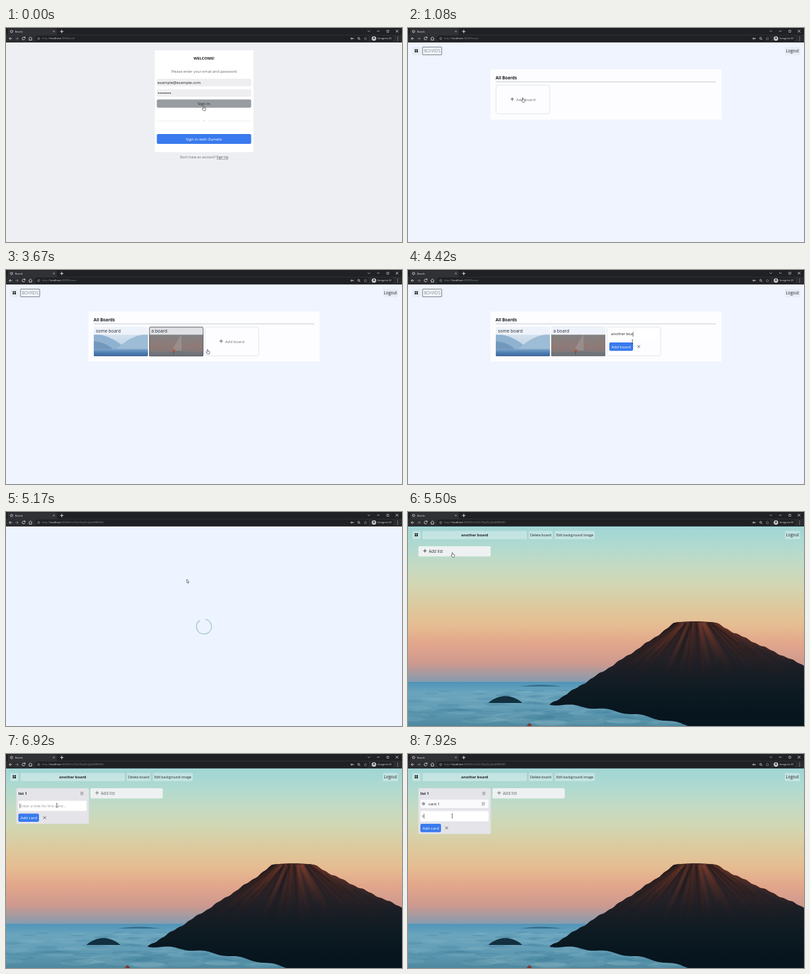
An HTML page with a canvas that plays this animation: 600x325 px, repeating every 8 s.

```html
<!DOCTYPE html>
<html lang="en">
<head>
<meta charset="utf-8">
<title>Boards</title>
<style>
  html, body { margin: 0; width: 100%; height: 100%; overflow: hidden; background: #eff4fe; }
  canvas { display: block; width: 600px; height: 325px; }
</style>
</head>
<body>
<canvas id="stage"></canvas>
<script>
const LOOP = 8000, TAU = Math.PI * 2;
const canvas = document.getElementById('stage');
const ratio = window.devicePixelRatio || 1;
canvas.width = 600 * ratio;
canvas.height = 325 * ratio;
const ctx = canvas.getContext('2d');

// ---------- helpers ----------
const smooth = k => k * k * (3 - 2 * k);
const random = seed => { const n = Math.sin(seed * 127.1) * 43758.5; return n - Math.floor(n); };

function box(x, y, w, h, fill, radius = 0, stroke, line = 0.7) {
  ctx.beginPath();
  ctx.roundRect(x, y, w, h, radius);
  if (fill) { ctx.fillStyle = fill; ctx.fill(); }
  if (stroke) { ctx.strokeStyle = stroke; ctx.lineWidth = line; ctx.stroke(); }
}

function label(str, x, y, size, color = '#222', weight = 400, align = 'left') {
  ctx.font = `${weight} ${size}px "Open Sans", "Noto Sans", sans-serif`;
  ctx.textAlign = align;
  ctx.fillStyle = color;
  ctx.fillText(str, x, y + size * 0.34);
  return x + ctx.measureText(str).width;
}

// Draws an SVG path whose coordinates are relative to (x, y).
function glyph(d, x, y, stroke, line = 0.8, fill) {
  ctx.save();
  ctx.translate(x, y);
  const p = new Path2D(d);
  if (fill) { ctx.fillStyle = fill; ctx.fill(p); }
  ctx.strokeStyle = stroke;
  ctx.lineWidth = line;
  ctx.stroke(p);
  ctx.restore();
}

function ring(x, y, r, color, width = 0.7, from = 0, to = TAU) {
  ctx.beginPath();
  ctx.arc(x, y, r, from, to);
  ctx.strokeStyle = color;
  ctx.lineWidth = width;
  ctx.stroke();
}

function blob(x, y, rx, ry, fill) {
  ctx.beginPath();
  ctx.ellipse(x, y, rx, ry, 0, 0, TAU);
  ctx.fillStyle = fill;
  ctx.fill();
}

// Evenly spaced colours from top to bottom.
function fade(top, bottom, ...colors) {
  const g = ctx.createLinearGradient(0, top, 0, bottom);
  colors.forEach((c, i) => g.addColorStop(i / (colors.length - 1), c));
  return g;
}

// Path of the area between two curves of x.
function between(from, to, upper, lower) {
  ctx.beginPath();
  for (let x = from; x <= to; x++) ctx.lineTo(x, upper(x));
  for (let x = to; x >= from; x--) ctx.lineTo(x, lower(x));
  ctx.closePath();
}

function hill(from, to, upper, base, fill) {
  between(from, to, upper, () => base);
  ctx.fillStyle = fill;
  ctx.fill();
}

const plus = (x, y, color) => glyph('M-2.6 0h5.2M0-2.6v5.2', x, y, color, 0.9);
const cross = (x, y, color) => glyph('M-2-2l4 4M-2 2l4-4', x, y, color);
const trash = (x, y) => glyph('M-2.2-1.8h4.4M-1.5-1.8v4h3v-4M0-.6v1.8', x, y, '#777', 0.6);

// ---------- browser window ----------
function chrome(path) {
  const icon = '#e2e4e7', dim = '#85888d';
  box(0, 0, 600, 10.5, '#202124');
  box(0, 10, 600, 12, '#2b2c30');
  box(3, 0.8, 74, 12, '#303135', 2);
  ring(8.5, 5.3, 1.7, icon, 0.8);
  label('Boards', 13.7, 5.3, 3.6, icon);
  glyph('M-1.1-1.1l2.2 2.2m0-2.2l-2.2 2.2', 72.5, 5.3, icon, 0.6);
  plus(84.5, 5.3, icon);
  glyph('M-1.8-.8L0 .8 1.8-.8', 549.8, 4.8, icon, 0.6);
  glyph('M-2 0h4', 564, 4.8, icon, 0.6);
  box(577, 3.4, 3, 3, null, 0, icon, 0.6);
  cross(592.5, 4.8, icon);

  glyph('M2.2 0h-4.4l2-2m-2 2l2 2', 7, 16, icon);
  glyph('M-2.2 0h4.4l-2-2m2 2l-2 2', 16.4, 16, dim);
  ring(26.5, 16, 2, icon, 0.8, 0.2, 5.4);
  glyph('M.5-2.5h2.2v2.2z', 26.5, 16, icon, 0.2, icon);
  glyph('M-2.7 0L0-2.5 2.7 0M-1.8-.5v2.9h3.6v-2.9', 37, 16, icon);

  box(44, 11.5, 506, 9, '#1f2023', 4.5);
  ring(49.5, 16, 1.7, '#a0a3a8', 0.6);
  glyph('M0-.4v1.4', 49.5, 16, '#a0a3a8', 0.6);
  let x = label('http://', 54.5, 16, 4.1, dim);
  x = label('localhost', x, 16, 4.1, icon);
  label(':3000/' + path, x, 16, 4.1, dim);

  ring(523.5, 16, 1, icon, 0.8);
  glyph('M1 0h2.7', 523.5, 16, icon);
  ring(534.3, 15.6, 1.4, icon);
  glyph('M1 1l1.4 1.4', 534.3, 15.6, icon);
  glyph('M0-2.2l.7 1.5 1.6.2-1.2 1.1.3 1.6L0 1.4l-1.4.8.3-1.6-1.2-1.1 1.6-.2z', 544.6, 16, icon, 0.3);
  box(552.5, 11.8, 35, 8.6, '#202124', 4.3);
  blob(557.5, 16, 3.3, 3.3, '#f1f3f4');
  glyph('M-2-.3h4l-1-1.7h-2z', 557.5, 16, '#333', 0.2, '#333');
  for (const side of [-1, 1]) ring(557.5 + side * 1.1, 17, 0.7, '#333', 0.5);
  label('Incognito (2)', 563, 16, 3.7, icon);
  for (let i = -1; i <= 1; i++) blob(593.5, 16 + i * 2.2, 0.5, 0.5, icon);
}

function navButton(x, w, text, size, fill, weight) {
  box(x, 28.7, w, 12.5, fill, 1.5);
  label(text, x + w / 2, 35, size, '#22262a', weight, 'center');
}

function gridButton(fill) {
  box(6.5, 28.7, 12.5, 12.5, fill, 1.5);
  for (let i = 0; i < 4; i++) box(10.2 + (i % 2) * 2.7, 32.3 + (i >> 1) * 2.7, 2.1, 2.1, '#15181b', 0.3);
}

// ---------- pictures ----------
const SUMMIT = 168;

function ridge(x) {
  const rough = Math.sin(x * 0.45) * 0.5 + Math.sin(x * 0.17) * 0.7;
  if (x < 404) return SUMMIT + 124 * ((404 - x) / 189) ** 0.93 + rough;
  if (x > 466) return SUMMIT + 65 * ((x - 466) / 134) ** 0.93 + rough;
  return SUMMIT - 2 * Math.sin((x - 404) / 62 * Math.PI);
}

function foot(x) {
  return Math.min(325, 292 + 33 * Math.max(0, (x - 215) / 213) ** 1.5 + Math.sin(x * 0.12) * 1.5);
}

function clouds() {
  box(0, 258, 600, 67, fade(258, 325, '#4f94b8', '#6ba5bd', '#659fb8', '#5b96af', '#4d889f'));
  for (let i = 0; i < 130; i++) {
    const depth = random(i + 0.5);
    const color = random(i + 0.7) < 0.55 ? '150,192,206' : '42,108,140';
    blob(random(i) * 440, 267 + depth * 56, 8 + depth * 20, 1 + depth * 3, `rgba(${color},.16)`);
  }
}

function mountain() {
  ctx.save();
  between(215, 600, ridge, foot);
  ctx.fillStyle = fade(SUMMIT, 310, '#442a29', '#2e2427', '#1a1e25', '#0d1a22', '#06151e');
  ctx.fill();
  ctx.clip();
  // Lit streaks and gullies fan out from the crater, redder on the right.
  for (let i = 0; i < 90; i++) {
    const turn = random(i + 0.2), angle = Math.PI * (0.13 + 0.72 * turn);
    const length = 50 + 110 * random(i + 0.4);
    const x = 466 - 58 * turn, lit = random(i + 0.6) > 0.25 + turn * 0.5;
    ctx.strokeStyle = fade(SUMMIT, SUMMIT + 95, lit ? 'rgba(132,62,42,.28)' : 'rgba(14,18,24,.3)', 'rgba(40,24,26,0)');
    ctx.lineWidth = 2 + 5 * random(i + 0.8);
    ctx.beginPath();
    ctx.moveTo(x, SUMMIT);
    ctx.lineTo(x + Math.cos(angle) * length, SUMMIT + Math.sin(angle) * length);
    ctx.stroke();
  }
  ctx.restore();
}

function volcano() {
  box(0, 22, 600, 238, fade(22, 260, '#a0d5d5', '#b0dad0', '#c4dac3', '#d2d6b2', '#dcca9f', '#e6bd92', '#e2a68b', '#cd998f', '#7f9cb2'));
  clouds();
  hill(170, 233, x => 265 - 2.6 * Math.sin((x - 170) / 63 * Math.PI), 265, '#356c8a');
  hill(122, 173, x => 290 - 10.5 * Math.sin((x - 122) / 51 * Math.PI) ** 0.8, 290, '#12303f');
  mountain();
  hill(180, 188, x => 320.5 + Math.abs(x - 184), 325, '#7c3631');
}

function lake() {
  box(0, 0, 82, 34, fade(0, 34, '#e4ebf3', '#b9d0e4'));
  hill(0, 50, x => 11 + 23 * (x / 50) ** 2, 34, '#8fb2d0');
  hill(34, 82, x => 11 + 23 * ((82 - x) / 48) ** 2, 34, '#9dbcd6');
  hill(0, 30, x => 22 + 12 * (x / 30) ** 2, 34, '#7299bd');
  box(0, 33.5, 82, 12, fade(33.5, 45, '#7fa5c9', '#4c7db2', '#3f6797'));
}

function dusk() {
  box(0, 0, 82, 45, fade(0, 45, '#818c90', '#84807f', '#8f7a77', '#74777b'));
  hill(34, 49, x => 36 - (x - 34) * 1.7, 36, 'rgba(190,195,195,.25)');
  hill(0, 82, x => 38 + Math.sin(x / 9), 45, '#70747a');
  blob(37, 36, 3, 2.6, '#a9655a');
  glyph('M0 0v6', 37, 36, '#4b4342');
}

function volcanoThumb() {
  ctx.scale(0.15, 0.15);
  ctx.translate(-45, -24);
  volcano();
}

// ---------- forms ----------
// Text typed evenly within a span of time.
function typed(str, t, start, end) {
  return str.slice(0, Math.max(0, Math.ceil((t - start) / (end - start) * str.length)));
}

function textInput(x, y, w, h, text, hint, t) {
  const mid = y + h / 2;
  box(x, y, w, h, '#fff', 2);
  const end = label(text || hint, x + 2.5, mid, 5.8, text ? '#222' : '#8e9196');
  if (text || t % 1060 < 960) glyph('M0-3.8v7.6', text ? end + 0.3 : x + 2.2, mid, '#222', 0.6);
}

function formButtons(x, y, text, w = 31.3) {
  box(x, y, w, 12.7, '#397aee', 2);
  label(text, x + w / 2, y + 6.5, 6, '#fff', 400, 'center');
  cross(x + w + 8.5, y + 6.3, '#3e4248');
}

// ---------- pages ----------
function loginPage() {
  const centered = (str, y, size, color, weight) => label(str, 300, y, size, color, weight, 'center');
  const field = (y, h, fill) => box(228.5, y, 143, h, fill, 2);
  box(0, 22, 600, 303, '#eeeff2');
  box(225.5, 34, 149.5, 154.5, '#fff');
  centered('WELCOME!', 46, 6, '#1c1c1e', 700);
  centered('Please enter your email and password', 66.5, 5.57, '#65676b');
  field(77, 11.5, '#eeeef1');
  label('example@example.com', 229.5, 83, 5.9);
  field(93, 11.5, '#eeeef1');
  for (let i = 0; i < 8; i++) blob(231.2 + i * 2.55, 98.8, 0.85, 0.85, '#222');
  field(108.5, 12.5, '#989da2');
  centered('Sign In', 115, 6.1, '#26282b');
  glyph('M229 141h65m12 0h65', 0, 0, '#e6e6ea');
  centered('or', 141, 4.2, '#c3c4c8');
  field(161, 15, '#397aee');
  centered('Sign in with Zumelo', 169, 6, '#fff');
  const x = label("Don't have an account? ", 263.5, 196.5, 5, '#66686c');
  const end = label('Sign Up', x, 196.5, 5, '#3c3e42');
  box(x, 199, end - x, 0.4, '#55575b');
}

function loaderPage(t) {
  box(0, 22, 600, 303, '#edf4ff');
  const turn = (t - 5170) / 1000 * TAU - 1.4;
  ring(300, 174, 11.4, '#a4c6d2', 1.3, turn, turn + 5.5);
}

const boards = [
  { title: 'some board', photo: lake, open: 1150, made: 2310 },
  { title: 'a board', photo: dusk, open: 2640, made: 3380, hover: 360 },
  { title: 'another board', photo: volcanoThumb, open: 3880, made: 4660, hover: 400 },
];
const cardX = i => 133 + 84 * i;

function boardCard(x, board, t) {
  const hovered = t - board.made < board.hover;
  ctx.save();
  ctx.beginPath();
  ctx.roundRect(x, 86.5, 82, 44.5, 1.5);
  ctx.clip();
  ctx.translate(x, 86.5);
  board.photo();
  ctx.restore();
  box(x, 86.5, 82, 11.7, hovered ? '#dfe1e5' : '#eef2fa', 1);
  if (hovered) box(x + 0.3, 86.8, 81.4, 43.9, null, 1.5, '#4a4d52', 0.8);
  label(board.title, x + 3.3, 93, 6.7, '#24282e');
}

function addBoardCard(x, board, t) {
  box(x + 0.4, 86.7, 81.4, 43.6, '#fdfdff', 2.5, '#dbe0ea', 0.8);
  if (board && t >= board.open) {
    const text = typed(board.title, t, board.open + 100, board.made - 120);
    textInput(x + 4, 91, 74, 13, text, 'Enter board title...', t);
    formButtons(x + 4, 110, 'Add board', 36);
  } else {
    plus(x + 25, 108, '#50545a');
    label('Add board', x + 31, 108.5, 5.95, '#6c7078');
  }
}

function homePage(t) {
  box(0, 22, 600, 303, '#eff4fe');
  gridButton('#e6ebf4');
  box(22, 29, 29, 11.7, '#f3f6fc', 0.5, '#5a5e64', 0.8);
  label('BOARDS', 36.6, 35.2, 6.5, '#4b5563', 300, 'center');
  navButton(571, 23, 'Logout', 6.2, '#e6ebf4');
  box(125, 63, 350, 76, '#fdfdff', 1);
  label('All Boards', 132.8, 76, 6.4, '#1b1e22', 700);
  box(133, 81.4, 334, 0.9, '#b2bac6');
  const made = boards.filter(b => t >= b.made);
  made.forEach((b, i) => boardCard(cardX(i), b, t));
  addBoardCard(cardX(made.length), boards[made.length], t);
}

const steps = { listForm: 5750, listMade: 6450, cardForm: 6700, cardMade: 7560 };

function addList(x, color) {
  box(x, 52, 109.5, 15.5, 'rgba(243,244,245,.93)', 2);
  plus(x + 10, 59, color);
  label('Add list', x + 15.7, 60, 6.2, color);
}

function card(text, y) {
  box(18.7, y - 6.3, 103.5, 12.8, '#fafafc', 2);
  blob(23.5, y, 2.3, 2.3, '#85888e');
  glyph('M-1.1 0l.8.9 1.5-2', 23.5, y, '#fff', 0.6);
  label(text, 31, y + 0.2, 5.9);
  trash(114, y);
}

function firstList(t) {
  const panel = h => box(15.7, 52, 109.8, h, '#e4e4e9', 2);
  if (t < steps.listMade) {
    panel(38);
    textInput(18.7, 55, 103.5, 15.5, typed('list 1', t, 5960, 6380), 'Enter list title...', t);
    return formButtons(18.7, 74.3, 'Add list');
  }
  const open = t >= steps.cardForm, hasCard = t >= steps.cardMade;
  const shift = hasCard ? 15.6 : 0;
  panel(open ? 54 + shift : 32);
  label('list 1', 18.7, 60, 5.5, '#1e2125', 700);
  trash(115, 59.8);
  if (!open) {
    plus(24, 76, '#50545a');
    return label('Add card', 30, 76.5, 6, '#50545a');
  }
  if (hasCard) card('card 1', 75.6);
  const text = hasCard ? typed('card 2', t, 7860, 8400) : typed('card 1', t, 7050, 7500);
  textInput(18.7, 71 + shift, 103.5, 15.6, text, 'Enter a title for this card...', t);
  formButtons(18.7, 90.4 + shift, 'Add card');
}

function boardPage(t) {
  const glass = 'rgba(255,255,255,.33)';
  volcano();
  gridButton(glass);
  navButton(22, 158, 'another board', 5.7, glass, 700);
  navButton(183, 36, 'Delete board', 5.3, glass);
  navButton(222.5, 60.5, 'Edit background image', 5.25, glass);
  navButton(571, 23, 'Logout', 6.2, glass);
  if (t < steps.listForm) return addList(15.7, '#33373c');
  firstList(t);
  if (t >= steps.listMade) addList(128, '#63676c');
}

// ---------- pointer ----------
// It rests on each card while a board is made, then eases to the next stop.
const stops = [
  { at: 0, x: 300, y: 122 }, { at: 330, x: 300, y: 122 },
  ...boards.flatMap(({ open, made }, i) => [open, made].map(at => ({ at, x: cardX(i) + 39, y: 109 }))),
  { at: 3670, x: 306, y: 124 },
  { at: 5040, x: 326, y: 115 }, { at: 5500, x: 68, y: 65 }, { at: steps.listForm, x: 68, y: 65 },
  { at: 6920, x: 77, y: 78 }, { at: steps.cardMade, x: 72, y: 82 }, { at: 7840, x: 67, y: 94 }, { at: LOOP, x: 67, y: 94 },
].sort((a, b) => a.at - b.at);

function pointerLook(t, page) {
  const within = (from, to) => t >= from && t < to;
  if (page === loaderPage) return 'arrow';
  const typing = boards.some(b => within(b.open, b.made)) || within(steps.listForm, steps.listMade) || t >= steps.cardForm;
  return typing ? 'beam' : 'hand';
}

function pointer(t, look) {
  const next = stops.findIndex(s => s.at > t);
  const a = stops[next - 1], b = stops[next];
  const k = smooth((t - a.at) / (b.at - a.at));
  const x = a.x + (b.x - a.x) * k, y = a.y + (b.y - a.y) * k;
  if (look === 'beam') glyph('M0-2.8v5.6M-1.1-2.8h2.2M-1.1 2.8h2.2', x, y, '#222', 0.6);
  else if (look === 'arrow') glyph('M-1.2-3v5.4l1.2-1 .9 1.7.8-.4-.8-1.7 1.3-.2z', x, y, '#333', 0.6, '#fff');
  else glyph('M-1.2-3.2h1l.2 2.4 2.4.6.4 1.2-.8 2.6h-3l-1.8-2.8.6-.6 1 .8z', x, y, '#333', 0.6, '#fff');
}

// ---------- loop ----------
function pageAt(t) {
  if (t < 300) return [loginPage, 'auth'];
  if (t < 560) return [loaderPage, 'home'];
  if (t < 5060) return [homePage, 'home'];
  return [t < 5340 ? loaderPage : boardPage, 'b/uYt3z7Kq2VnjDwM8BrN5'];
}

function frame() {
  const t = performance.now() % LOOP;
  const [page, address] = pageAt(t);
  ctx.setTransform(ratio, 0, 0, ratio, 0, 0);
  page(t);
  chrome(address);
  pointer(t, pointerLook(t, page));
  requestAnimationFrame(frame);
}
frame();
</script>
</body>
</html>
```
